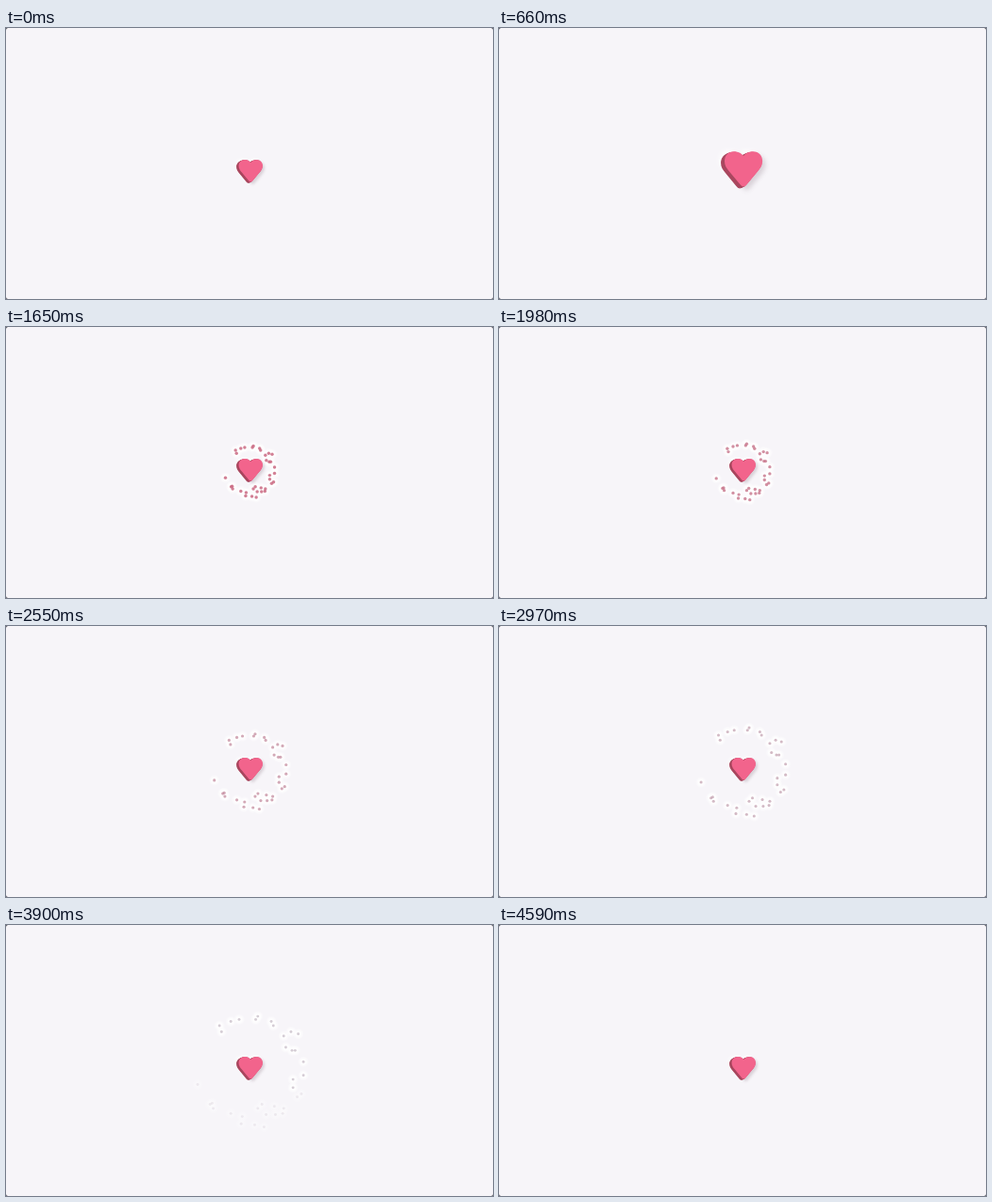
An HTML page that plays this animation: 516 px wide and 288 px high, repeating every 4.68 s.

```html
<!DOCTYPE html>
<html lang="en">
<head>
<meta charset="utf-8">
<title>Heart burst</title>
<style>
  html, body { margin: 0; width: 100%; height: 100%; overflow: hidden; background: #55545a; }
  svg { display: block; width: 100%; height: 100%; }
</style>
</head>
<body>
<svg viewBox="0 0 516 288">
  <defs>
    <path id="shape" d="M-.4-12C1.3-14.4 4-15 6-15C10-15 12.3-12 12.3-8.6C12.3-5.6 11-3.8 9-1.5L2 7Q-.4 10.2-2.8 7L-9.8-1.5C-11.8-3.8-13.1-5.6-13.1-8.6C-13.1-12-10.8-15-6.8-15C-4.8-15-2.1-14.4-.4-12Z"/>
    <radialGradient id="glow">
      <stop offset=".45" stop-color="#fff"/>
      <stop offset="1" stop-color="#fff" stop-opacity="0"/>
    </radialGradient>
    <filter id="soft" x="-50%" y="-50%" width="200%" height="200%">
      <feGaussianBlur stdDeviation="1.6"/>
    </filter>
  </defs>
  <rect width="516" height="288" rx="2.5" fill="#f7f5f9"/>
  <g id="halos"></g>
  <g id="dots"></g>
  <g id="heart">
    <use href="#shape" x="-3.2" y="-.6" fill="#fff" filter="url(#soft)"/>
    <use href="#shape" x="2" y="2.4" fill="#77606f" opacity=".24" filter="url(#soft)"/>
    <g id="side" fill="#a9475f"></g>
    <use href="#shape" fill="#f2648c"/>
  </g>
</svg>
<script>
const LOOP = 4680, CX = 258, CY = 152;
const POINTS = [
  [-29, -41], [-27, -35], [-18, -45], [-10, -47], [6, -47], [8, -50],
  [21, -45], [23, -41], [33, -31], [40, -35], [47, -33], [35, -20],
  [41, -17], [44, -17], [52, -6], [52, 7], [42, 11], [42, 19],
  [50, 25], [46, 28], [33, 39], [32, 44], [24, 37], [25, 45],
  [16, 45], [8, 39], [12, 35], [14, 57], [5, 55], [-8, 54],
  [-7, 47], [-18, 44], [-38, 35], [-36, 34], [-35, 39], [-50, 16]
];
// time, spread of the ring
const SPREAD = [[900, .3], [1320, .465], [1980, .555], [2550, .745], [3360, 1], [4020, 1.12], [4600, 1.18]];

const $ = id => document.getElementById(id);
const add = (parent, tag, attrs) => {
  const el = document.createElementNS('http://www.w3.org/2000/svg', tag);
  for (const k in attrs) el.setAttribute(k, attrs[k]);
  return parent.appendChild(el);
};
const ramp = (t, a, b) => Math.min(1, Math.max(0, (t - a) / (b - a)));
const ease = p => p * p * (3 - 2 * p);
const mix = (a, b, p) => a + (b - a) * p;

function spreadAt(t) {
  let s = SPREAD[0][1];
  for (let i = 1; i < SPREAD.length; i++) {
    const [t0, a] = SPREAD[i - 1], [t1, b] = SPREAD[i];
    if (t >= t0) s = mix(a, b, ramp(t, t0, t1));
  }
  return s;
}

for (let i = 5; i > 0; i--) add($('side'), 'use', { href: '#shape', x: -.5 * i, y: .24 * i });

const parts = POINTS.map(([x, y], i) => ({
  x, y,
  end: y > 20 || x < -34 ? 4070 : 4400 + (i * 37) % 120,
  halo: add($('halos'), 'circle', { r: 6, fill: 'url(#glow)' }),
  dot: add($('dots'), 'circle', {})
}));

function draw(t) {
  const size = 1 + .58 * (ease(ramp(t, 0, 660)) - ease(ramp(t, 900, 1560)));
  $('heart').setAttribute('transform', `translate(259.7 155) scale(${size})`);

  const s = spreadAt(t), age = ramp(t, 1200, 3500);
  const rgb = [[205, 190], [88, 178], [116, 190]].map(([a, b]) => Math.round(mix(a, b, age)));
  $('dots').setAttribute('fill', `rgb(${rgb})`);
  for (const p of parts) {
    const life = t < 900 ? 0 : 1 - ramp(t, p.end - 500, p.end);
    for (const el of [p.halo, p.dot]) {
      el.setAttribute('cx', CX + p.x * s);
      el.setAttribute('cy', CY + p.y * s);
    }
    p.dot.setAttribute('r', mix(1.8, 1.45, age));
    p.dot.setAttribute('opacity', life * mix(.9, .65, age));
    p.halo.setAttribute('opacity', life * .85);
  }
}

function tick() {
  draw(performance.now() % LOOP);
  requestAnimationFrame(tick);
}
tick();
</script>
</body>
</html>
```
